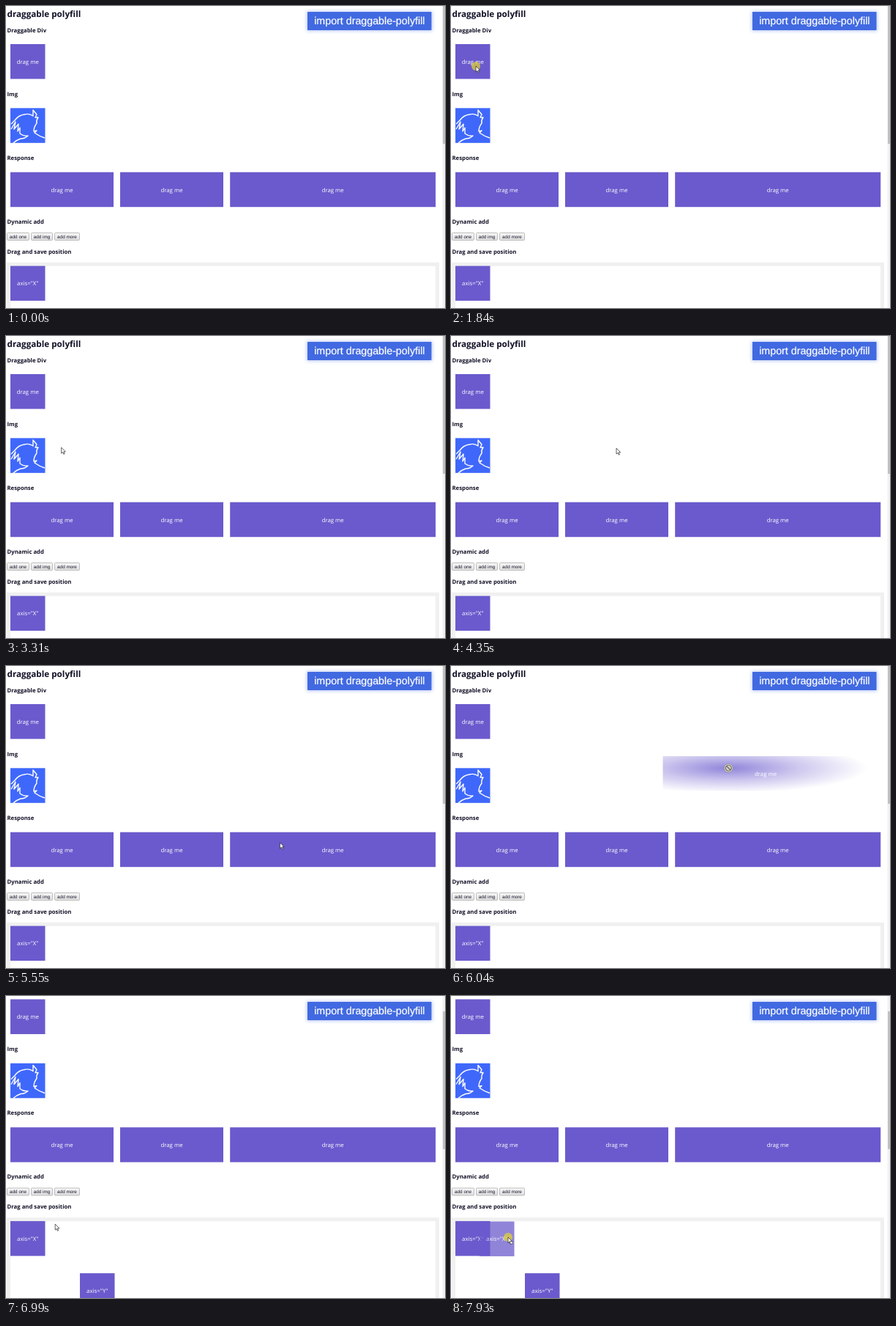
An HTML page that plays this animation: 600x412 px, repeating every 8000 ms.

```html
<!DOCTYPE html>
<html lang="en">
<head>
<meta charset="utf-8">
<title>draggable polyfill</title>
<style>
  html, body { margin: 0; width: 100%; height: 100%; overflow: hidden; background: #fff; }
  svg { display: block; width: 100vw; height: 100vh; }
  text { text-rendering: geometricPrecision; }
  .title, .heading { font: bold 7.75px "Open Sans", "Noto Sans", sans-serif; fill: #121228; }
  .title { font-size: 11.7px; }
  .label { font: 500 7.8px "Open Sans", "Noto Sans", sans-serif; fill: #fff; text-anchor: middle; }
  .button { font: 6.35px "Liberation Sans", sans-serif; fill: #15152c; text-anchor: middle; }
  .banner { font: 14.25px "Liberation Sans", sans-serif; fill: #fff; stroke: #fff; stroke-width: .2; }
</style>
</head>
<body>
<svg viewBox="0 0 600 412">
  <defs>
    <linearGradient id="buttonFill" x2="0" y2="1">
      <stop stop-color="#f8f8f8"/><stop offset="1" stop-color="#dfdfdf"/>
    </linearGradient>
    <radialGradient id="fade" gradientUnits="userSpaceOnUse" cx="0" cy="0" r="1"
                    gradientTransform="translate(396 243) scale(190 34)">
      <stop stop-color="#fff"/>
      <stop offset=".5" stop-color="#fff" stop-opacity=".45"/>
      <stop offset="1" stop-color="#fff" stop-opacity="0"/>
    </radialGradient>
    <mask id="fadeMask" maskUnits="userSpaceOnUse" x="300" y="220" width="300" height="60">
      <rect x="300" y="220" width="300" height="60" fill="url(#fade)"/>
    </mask>
    <filter id="glow" x="-10%" y="-40%" width="120%" height="180%">
      <feGaussianBlur stdDeviation="2.5"/>
    </filter>
  </defs>

  <g id="page">
    <text class="title" x="1.5" y="14.5">draggable polyfill</text>
    <g id="content"></g>
    <g id="picture">
      <rect x="6" y="139.3" width="47.5" height="47.5" fill="#3f68fb"/>
      <path fill="none" stroke="#fff" stroke-width="1.4" stroke-linejoin="round"
        d="M7 161L12 156Q17 149 25 148Q32 146 37 150L37 142L42 148L40 152L44 152
           Q41 156 42 160Q38 165 38 171L42 170L39 173Q46 178 53 180
           M7 168L13 158L11 168L17 161L16 171L19 166L19 174Q24 178 30 177Q26 181 20 181Q14 183 10 187"/>
    </g>
    <g id="ghost" opacity=".74"><use id="ghostShape"/></g>
  </g>

  <rect x="596.5" width="3.5" height="412" fill="#f1f1f1"/>
  <rect id="thumb" x="597" width="3" height="188" fill="#c1c1c1"/>

  <rect x="411" y="7.5" width="171.5" height="26.5" fill="#4169e1" opacity=".38" filter="url(#glow)"/>
  <rect x="412" y="8" width="169.5" height="25" fill="#4169e1"/>
  <text class="banner" x="421.2" y="25.2">import draggable-polyfill</text>

  <g id="pointer">
    <circle id="press" r="6" fill="#e6d52c" opacity=".7"/>
    <g id="arrow">
      <path d="M0 0V8L1.9 6.3L3.2 9.2L4.5 8.6L3.2 5.8H5.7Z" fill="#fff" stroke="#222" stroke-width=".7"/>
      <rect id="dropMark" x="2.5" y="6" width="4" height="3" fill="#eee" stroke="#333" stroke-width=".6"/>
    </g>
    <g id="noDrop" stroke="#666">
      <circle r="5.8" fill="#f0eedd" stroke-width=".5"/>
      <path d="M-3-3L3 3M4 0A4 4 0 1 1-4 0A4 4 0 1 1 4 0" fill="#d5d1c4" stroke-width="1.2"/>
    </g>
  </g>
</svg>
<script>
const LOOP = 8000;
const SCROLL = 47.5;
const SCROLL_START = 6560;
const SCROLL_TIME = 200;
const ENTRY = [547, 349];

const $ = id => document.getElementById(id);
const show = (id, on) => $(id).setAttribute("display", on ? "inline" : "none");
const move = (id, x, y) => $(id).setAttribute("transform", `translate(${x} ${y})`);

const heading = (y, text) => `<text class="heading" x="1.5" y="${y}">${text}</text>`;
const box = (id, x, y, width, text) => `<g id="${id}">
  <rect x="${x}" y="${y}" width="${width}" height="47.5" fill="#6a5acd"/>
  <text class="label" x="${x + width / 2}" y="${y + 26.8}">${text}</text></g>`;
const button = (x, width, text) => `
  <rect x="${x}" y="309.5" width="${width}" height="10" rx="1" fill="url(#buttonFill)" stroke="#a4a4a4" stroke-width=".7"/>
  <text class="button" x="${x + width / 2}" y="316.6">${text}</text>`;

$("content").innerHTML = [
  heading(35.6, "Draggable Div"), heading(122.7, "Img"), heading(209.6, "Response"),
  heading(296.6, "Dynamic add"), heading(337.6, "Drag and save position"),
  box("square", 6, 52, 47.5, "drag me"),
  box("narrow1", 6, 226.7, 141, "drag me"),
  box("narrow2", 156, 226.7, 141, "drag me"),
  box("wide", 306.2, 226.7, 281, "drag me"),
  button(1.5, 30, "add one"), button(34.5, 29, "add img"), button(66.5, 34, "add more"),
  `<rect x="3.5" y="352.3" width="586" height="200" fill="#fff" stroke="#f0f0f0" stroke-width="5"/>`,
  box("axisX", 6, 354.6, 47.5, 'axis="X"'),
  box("axisY", 101, 425.7, 47.5, 'axis="Y"')
].join("");

// The pointer approaches, presses at grab, drags along a curve bent towards bend, and lets go at drop.
const drags = [
  { shape: "square", approach: 420, press: 1600, start: 1950, rest: 2620, end: 2930,
    grab: [34, 82], bend: [120, 30], drop: [236, 113] },
  { shape: "picture", approach: 2930, press: 3600, start: 3760, rest: 4300, end: 4300,
    grab: [39, 161], bend: [130, 80], drop: [226, 153] },
  { shape: "narrow2", approach: 4650, press: 4930, start: 5040, rest: 5340, end: 5340,
    grab: [235, 246], bend: [230, 71], drop: [270, 231] },
  { shape: "wide", approach: 5340, press: 5700, start: 5780, rest: 6350, end: 6490, faded: true,
    grab: [396, 243], bend: [470, 130], drop: [301, 129] },
  { shape: "axisX", approach: 6490, press: 7200, start: 7320, rest: 7930, end: LOOP, droppable: true,
    grab: [45, 328.5], bend: [60, 324], drop: [78, 329] }
];

const clamp = k => Math.min(1, Math.max(0, k));
const mix = (a, b, k) => a.map((v, i) => v + (b[i] - v) * k);

function easeOut(t, from, to) {
  const k = clamp((t - from) / (to - from));
  return k * (2 - k);
}

function pointerAt(t, drag, origin) {
  if (t < drag.start) return mix(origin, drag.grab, easeOut(t, drag.approach, drag.press));
  const k = easeOut(t, drag.start, drag.rest);
  return mix(mix(drag.grab, drag.bend, k), mix(drag.bend, drag.drop, k), k);
}

function render(t) {
  const index = drags.findIndex(d => t < d.end);
  const drag = drags[index];
  const origin = index ? drags[index - 1].drop : ENTRY;
  const [x, y] = pointerAt(t, drag, origin);
  const dragging = t >= drag.start;
  const blocked = dragging && !drag.droppable;

  const scroll = SCROLL * easeOut(t, SCROLL_START, SCROLL_START + SCROLL_TIME);
  move("page", 0, -scroll);
  $("thumb").setAttribute("y", scroll * 0.44);

  show("ghost", dragging);
  if (dragging) {
    $("ghostShape").setAttribute("href", "#" + drag.shape);
    move("ghost", x - drag.grab[0], y - drag.grab[1]);
    $("ghost").setAttribute("mask", drag.faded ? "url(#fadeMask)" : "none");
  }

  show("pointer", t >= drags[0].approach);
  move("pointer", x, y);
  show("press", t >= drag.press && !blocked);
  show("arrow", !blocked);
  show("dropMark", dragging);
  show("noDrop", blocked);
}

function frame() {
  render(performance.now() % LOOP);
  requestAnimationFrame(frame);
}
frame();
</script>
</body>
</html>
```
